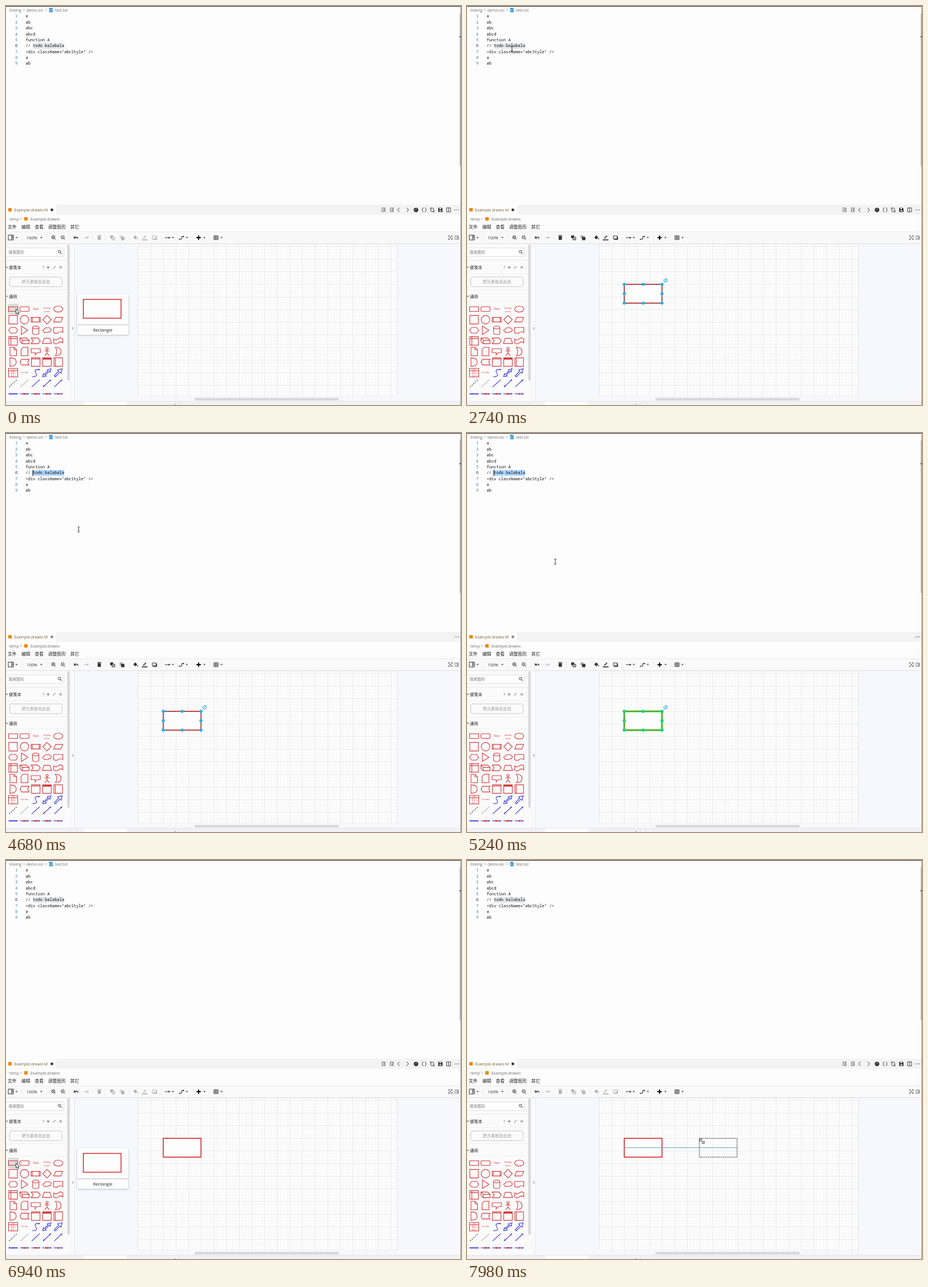
An HTML page for the animation above (8 s loop, 799 px wide and 701 px high).

```html
<!DOCTYPE html>
<html lang="zh">
<head>
<meta charset="utf-8">
<title>Diagram editor</title>
<style>
html, body { margin: 0; width: 100%; height: 100%; overflow: hidden; background: #fdfdfd; }
svg { display: block; width: 799px; height: 701px; }
text { white-space: pre; }
.ui { font: 6.9px "Open Sans", sans-serif; fill: #6b6b6b; }
.cjk { font: 7.8px "Noto Sans CJK SC", "Noto Sans CJK", sans-serif; fill: #222; }
.code { font: 7.05px "Noto Sans Mono", monospace; fill: #111; }
.serif { font-family: "Liberation Serif", serif; fill: #d33; }
.line { fill: none; stroke: #333; stroke-width: 1; }
.red { fill: none; stroke: #d33a3a; stroke-width: 1.1; }
.blue { fill: none; stroke: #3434cf; stroke-width: 1.1; }
</style>
</head>
<body>
<svg id="stage" viewBox="0 0 799 701"></svg>
<script>
const LOOP = 8000;
const BOX = { x: 276.2, y: 489, w: 66.2, h: 33 };
const INK = '#333';

const rect = (x, y, w, h, fill, more = '') =>
  `<rect x="${x}" y="${y}" width="${w}" height="${h}" fill="${fill}" ${more}/>`;
const text = (cls, x, y, s, more = '') => `<text class="${cls}" x="${x}" y="${y}" ${more}>${s}</text>`;
const path = (d, cls = 'line', more = '') => `<path class="${cls}" d="${d}" ${more}/>`;
const solid = (d, fill = INK) => `<path d="${d}" fill="${fill}"/>`;
const dot = (x, y, r, fill, more = '') => `<circle cx="${x}" cy="${y}" r="${r}" fill="${fill}" ${more}/>`;
const group = (id, body, more = '') => `<g id="${id}" ${more}>${body}</g>`;
const at = (x, y, body) => `<g transform="translate(${x} ${y})">${body}</g>`;
const chevron = (x, y) => path(`M${x - 1} ${y - 2}l2 2l-2 2`, 'line', 'stroke="#777" style="stroke:#777;stroke-width:.7"');
const caretDown = x => solid(`M${x - 2.2} 405.8h4.4l-2.2 2.6z`, '#666');

function codePane() {
  const lines = ['a', 'ab', 'abc', 'abcd', 'function A', '// todo balabala',
    '&lt;div className="abcStyle" /&gt;', 'a', 'ab'];
  const rows = lines.map((s, i) => {
    const y = 20.4 + i * 10.38;
    return text('code', 20.2, y, i + 1, `text-anchor="end" style="fill:${i === 5 ? '#0b216f' : '#35809a'}"`) +
      text('code', 34.5, y, s);
  }).join('');
  return rect(0, 0, 799, 349, '#fdfdfd') +
    text('ui', 6, 9.5, 'linking') + chevron(31.5, 7) + text('ui', 36, 9.5, 'demo-src') + chevron(70.5, 7) +
    solid('M76 3h4l2 2v6h-6z', '#3b9bd6') + path('M77.3 6.5h3.2M77.3 8.5h3.2', 'line', 'style="stroke:#fff;stroke-width:.6"') +
    text('ui', 86, 9.5, 'test.txt') +
    rect(47, 65, 55.2, 10.3, '#e3e8ec', 'id="picked"') + rows +
    dot(66.2, 70, .5, '#888') +
    group('caret', rect(46.6, 64.8, 1.1, 10.6, '#000')) +
    rect(796.5, 13, 2, 268, '#c6c6c6') + rect(796.5, 53, 2.5, 2, '#444');
}

function tabIcons() {
  const indent = x => path(`M${x - 3.5} 355h7M${x} 357h3.5M${x} 359h3.5M${x - 3.5} 361h7M${x - 3.5} 357l2 1.1l-2 1`, 'line', 'style="stroke-width:.8"');
  return indent(663) + indent(677.5) +
    path('M691 354.5l-3.5 3.7l3.5 3.7M703.5 354.5l3.5 3.7l-3.5 3.7') +
    solid('M720 354.5q4 0 4 3.5t-4 4.5q-4-1-4-4.5t4-3.5z') + path('M718.5 359l3-3', 'line', 'style="stroke:#fff;stroke-width:.7"') +
    path('M733 354.5q-1.5 0-1.5 1.7t-1.2 2q1.2.2 1.2 2t1.5 1.6M735.5 354.5q1.5 0 1.5 1.7t1.2 2q-1.2.2-1.2 2t-1.5 1.6', 'line', 'style="stroke-width:.9"') +
    path('M746 356.5v3.5q0 1.5 2 1.5h1.5M751 360v-3.5q0-1.500-2-1.500h-1.500', 'line', 'style="stroke-width:.9"') +
    dot(746, 355.5, 1.2, 'none', 'stroke="#333" stroke-width=".8"') + dot(751, 361, 1.2, 'none', 'stroke="#333" stroke-width=".8"') +
    solid('M759 354.500h6l1.500 1.500v6h-7.500z') + rect(761, 355, 3, 2, '#eee') + rect(761, 359, 3.5, 2, '#eee') +
    path('M773.700 354.700h7v7h-7zM777.200 354.700v7', 'line', 'style="stroke-width:.9"');
}

function tabBar() {
  return rect(0, 349, 799, 17.5, '#f3f3f3') + rect(0, 349, 88, 17.5, '#fdfdfd') +
    rect(4, 355, 6, 6, '#f08705') +
    text('ui', 14.3, 361, 'Example.drawio', 'style="fill:#7d6035"') + text('ui', 67, 361, 'M', 'style="fill:#7d6035"') +
    dot(80.5, 358.2, 2.4, INK, 'id="dirty"') + group('tools', tabIcons()) +
    [788.5, 791.5, 794.5].map(x => dot(x, 358.3, .7, INK)).join('') +
    text('ui', 6, 376.5, 'temp') + chevron(26.5, 374) + rect(32, 371, 6, 6, '#f08705') +
    text('ui', 43, 376.5, 'Example.drawio');
}

function toolbar() {
  const menu = [[3, '文件'], [27, '编辑'], [50.5, '查看'], [74, '调整图形'], [112.8, '其它']];
  const lens = (x, sign) => dot(x, 406.3, 2.8, 'none', 'stroke="#333" stroke-width="1"') +
    path(`M${x + 2} 408.3l2.3 2.4M${x - 1.4} 406.3h2.800${sign}`, 'line', 'style="stroke-width:.9"');
  const seps = [28, 71, 111, 152, 174, 216, 272, 327, 357];
  const layers = (x, a, b) => rect(x - 4, 403, 5, 5, a) + rect(x - 1, 406, 5, 5, b, 'stroke="#333" stroke-width=".8"');
  const edit = rect(161, 404.3, 5.6, 6.5, INK) + rect(160.3, 402.6, 7, 1.1, INK) +
    layers(187, INK, '#aaa') + layers(203.5, '#aaa', INK) +
    solid('M223.500 406.500l3.500-3.500l3.500 3.500l-3.500 3.500z') + dot(231, 409, 1, INK) +
    path('M241 408.500l5-5', 'line', 'style="stroke-width:1.7"') + rect(238.500, 410, 10, 1.700, INK) +
    path('M257 404h6.500v5h-6.500z') + path('M258 410h6.500v-5', 'line', 'style="stroke-width:1.3"');
  return rect(0, 380, 799, 17, '#fcfcfd') +
    menu.map(([x, s]) => text('cjk', x, 391, s)).join('') +
    rect(0, 397, 799, 20.500, '#f9f9fa') + rect(0, 396.500, 799, .7, '#e3e3e3') + rect(0, 417, 799, .9, '#dedede') +
    seps.map(x => rect(x, 401, .6, 12, '#e6e6e6')).join('') +
    path('M4 402.500h9v8.500h-9zM10 402.500v8.500M10 405h3M10 407.500h3') + caretDown(18.500) +
    text('ui', 36.3, 410, '100%', 'style="font-size:7.300px;fill:#333"') + caretDown(62) +
    lens(83, 'm-1.400-1.400v2.800') + lens(99.500, '') +
    path('M120.500 407.500q3.500-3.500 6.500 1M119.800 404.500v3.300h3.300', 'line', 'style="stroke-width:1.3"') +
    path('M143.500 407.500q-3.500-3.500-6.500 1M144.200 404.500v3.300h-3.300', 'line', 'opacity=".35"') +
    group('edit', edit) +
    path('M279 407h8') + solid('M285.500 405.200l3.500 1.800l-3.500 1.800z') + caretDown(293) +
    path('M304.500 410.500v-1h4v-4.500h3') + solid('M310.500 403.200l2.800 1.800l-2.800 1.800z') + dot(304.500, 410, 1, INK) + caretDown(317.500) +
    path('M338.200 403.200v7.500M334.500 407h7.500', 'line', 'style="stroke:#000;stroke-width:2"') + caretDown(348.500) +
    path('M365 403.500h7.500v7h-7.500zM365 405.800h7.500M365 408.200h7.500M367.500 403.500v7M370 403.500v7', 'line', 'style="stroke-width:.8"') + caretDown(378.500) +
    path('M777.500 405.500v-2h2M781.500 403.500h2v2M783.500 408v2.300h-2M779.500 410.300h-2v-2.300M779 405.500l3 3M782 405.500l-3 3', 'line', 'style="stroke-width:.9"') +
    path('M788.500 404h6v6h-6zM792 404v6M792.500 406h2M792.500 408h2', 'line', 'style="stroke:#777;stroke-width:.9"');
}

function palette() {
  const word = (s, size, y = 1) => text('serif', 0, y, s, `text-anchor="middle" style="font-size:${size}px"`);
  const head = (x, y, turn, fill = '#3434cf') => `<path d="M0 0l-3.200-1.500v3z" fill="${fill}" transform="translate(${x} ${y}) rotate(${turn})"/>`;
  const shapes = [
    ['M-8-4h16v8h-16z', 'M-6.500-4h13q1.500 0 1.500 1.500v5q0 1.500-1.500 1.500h-13q-1.500 0-1.500-1.500v-5q0-1.500 1.500-1.500z', 'TEXT', 'HEAD', 'M-8 0a8 5.300 0 0 1 16 0a8 5.300 0 0 1-16 0'],
    ['M-7.500-7.500h15v15h-15z', 'M-7.500 0a7.500 7.500 0 0 1 15 0a7.500 7.500 0 0 1-15 0', 'M-8-4h16v8h-16zM-6-4v8M6-4v8', 'M0-7.500l7.500 7.500l-7.500 7.500l-7.500-7.500z', 'M-4.500-4h12.500l-3.500 8h-12.500z'],
    ['M-4.500-5h9l3.500 5l-3.500 5h-9l-3.500-5z', 'M-5.500-7.500l11.500 7.500l-11.500 7.500z', 'M-5.500-5q0-2.500 5.500-2.500t5.500 2.500v10q0 2.500-5.500 2.500t-5.500-2.500zM-5.500-5q0 2.500 5.500 2.500t5.500-2.500', 'M-4.500-2q1-3.500 5-2.200q4-1.500 4.700 1.200q3.500 1 1.800 3.500q0 2.500-3.500 2.200q-3 2.800-5.500.5q-4 1.500-4.200-1.500q-3.500-1.700 1.700-3.700z', 'M-8-5h16v9q-4-3-8 0t-8 0z'],
    ['M-7.500-7.500h15v15h-15zM-7.500-4h15M-4-7.500v15', 'M-8-5h12l4 4v6h-12l-4-4zM-8-5l4 4h12M-4-1v6', 'M-8-5h12l4 5l-4 5h-12l3.500-5z', 'M-5-4.500h10l3 9h-16z', 'M-8-3.500q4 3.500 8 0t8 0v7q-4-3.500-8 0t-8 0z'],
    ['M-5.500-7.500h7l4.500 4.500v10.500h-11.500zM1.500-7.500v4.500h4.500', 'M-2-7.500h8v15h-12v-11z', 'M-8-5h16v7h-6l-3 4v-4h-7z', 'M-2-5.300a2 2 0 0 1 4 0a2 2 0 0 1-4 0M0-3.300v6.300M-4.500-1h9M0 3l-4 4.500M0 3l4 4.500', 'M-5-7.500q10 0 10 7.500t-10 7.500q5-7.500 0-15z'],
    ['M-5.500-7.500q11 0 11 7.500t-11 7.500z', 'M-5-5h13q-4 5 0 10h-13q-5-5 0-10z', 'M-7.500-7.500h15v15h-15zM-7.500-5.500h15', 'M-7.500-7.500h15v15h-15zM-7.500-5h15M-7.500-6.200h15', 'M-7.500-7.500h15v15h-15zM-5-7.500v15'],
    ['LIST', 'ITEM']
  ];
  const special = {
    TEXT: word('Text', 6, 1.500), HEAD: word('Heading', 3.600, -1) + word('lorem', 4, 5),
    LIST: path('M-8-7.500h16v15h-16zM-8-3.500h16', 'red') + word('List', 3.600, -4.400) + word('Item 1', 3.200, 0) + word('Item 2', 3.200, 3.200) + word('Item 3', 3.200, 6.300),
    ITEM: word('List Item', 3.600, 1)
  };
  const xs = [12.5, 32.5, 52.2, 72, 91.7], rowY = r => 532.500 + r * 18.620;
  let out = shapes.map((row, r) => row.map((d, c) =>
    at(xs[c], rowY(r), special[d] || path(d, 'red'))).join('')).join('');
  const slope = 'M-7 6.500L7-6.500';
  out += at(xs[2], rowY(6), path('M-6 7q11 0 6-6.500q-4-7 6-6', 'blue') + head(8, -5.500, 0)) +
    at(xs[3], rowY(6), path('M-7.500 7l1-5l1.500 1.500l7-7l-1.500-1.500l6.500-2l-1.500 6l-1.500-1.500l-7 7l1.500 1.500z', 'blue')) +
    at(xs[4], rowY(6), path('M-7 5.500l8-8.500l-2-2l8-2l-2 8l-2-2l-8 8.500z', 'blue'));
  ['stroke-dasharray="2 2" style="stroke:#222"', 'stroke-dasharray="1 1.500" style="stroke:#555"', '', '', ''].forEach((more, i) => {
    out += at(xs[i], rowY(7), path(slope, 'blue', more) + (i > 2 ? head(7, -6.500, -43) : '') + (i === 3 ? head(-7, 6.500, 137) : ''));
  });
  xs.forEach((x, i) => {
    out += at(x, rowY(8), path('M-8 0H8', 'blue', i ? '' : 'style="stroke-width:1.800"') +
      (i ? head(8, 0, 0) + rect(i === 4 ? -1.500 : -3, -1.2, i === 4 ? 3.500 : 6, 2.400, '#d33') : ''));
  });
  return out;
}

function sidebar() {
  const fold = y => solid(`M0 ${y}h3l-1.500 2.500z`, '#555');
  return rect(0, 418, 112, 276, '#fbfbfc') +
    rect(-2, 425, 103.500, 15, '#fff', 'rx="2" stroke="#d5d5d5" stroke-width=".8"') +
    text('cjk', 4.500, 434.800, '搜索图形', 'style="font-size:6.900px;fill:#777"') +
    dot(94, 431.500, 2.300, 'none', 'stroke="#444" stroke-width="1"') + path('M95.700 433.200l2.500 2.600') +
    rect(0, 446, 108, .7, '#e4e4e4') + fold(458) + text('cjk', 5, 462, '便笺本', 'style="font-size:7.300px"') +
    text('ui', 64, 461.500, '?', 'style="fill:#666"') + path('M74 456.700v5M71.500 459.200h5M82.500 461.500l4.500-4.500M94 457.200l4 4M98 457.200l-4 4', 'line', 'style="stroke:#666;stroke-width:1"') +
    rect(0, 470, 108, .7, '#eee') +
    rect(6.500, 476, 92, 17, 'none', 'rx="3" stroke="#999" stroke-dasharray="2 1.300" stroke-width=".9"') +
    text('cjk', 27.500, 487.300, '把元素拖至此处', 'style="font-size:7.200px;fill:#999"') +
    rect(0, 498, 108, .7, '#e8e8e8') + fold(509) + text('cjk', 5, 513, '通用', 'style="font-size:7.300px"') +
    rect(0, 519, 108, .7, '#eee') +
    rect(3, 523, 19.500, 19, '#dcdcdc', 'rx="3" id="hover"') + palette() +
    rect(107.500, 419, 4.500, 239, '#d9d9dc', 'rx="1"') + rect(112, 418, 8, 276, '#f9f9fb') + rect(120, 418, .8, 276, '#e6e6ea') +
    [564.800, 567].map(y => rect(116, y, 2.500, 1, '#888')).join('');
}

function canvasArea() {
  const step = 22.2, minor = step / 4;
  let fine = '', bold = '';
  for (let i = 1; i < 82; i++) {
    const x = (232 + i * minor).toFixed(2);
    if (i % 4) fine += `M${x} 418V686`; else bold += `M${x} 418V686`;
  }
  for (let i = -12; i < 36; i++) {
    const y = (BOX.y + i * minor).toFixed(2);
    if (i % 4) fine += `M232 ${y}H687`; else bold += `M232 ${y}H687`;
  }
  return rect(120, 418, 679, 276, '#f7f8fd') + rect(232, 418, 455, 268, '#fdfdfd', 'stroke="#dcdce0" stroke-width=".8"') +
    path(fine, 'line', 'style="stroke:#f3f3f3;stroke-width:.6"') + path(bold, 'line', 'style="stroke:#e5e5e6;stroke-width:.8"') +
    rect(120, 686, 679, 8, '#f8f8fa') + rect(331, 688.500, 253, 4.500, '#d9d9db', 'rx="1"') +
    rect(0, 694, 799, 7, '#f2f2f4') + rect(0, 694, 799, .7, '#e0e0e0') + rect(137, 695, 75, 6, '#fff') + rect(304, 695, .7, 6, '#ddd') +
    rect(296, 700, 2, 1, '#777');
}

function scene() {
  const { x, y, w, h } = BOX;
  let grips = rect(x, y, w, h, 'none', 'stroke="#333" stroke-width=".9" stroke-dasharray="2 2"');
  for (const i of [0, 1, 2]) for (const j of [0, 1, 2])
    if (i !== 1 || j !== 1) grips += dot(x + w * i / 2, y + h * j / 2, 2.8, '#29b0e8');
  grips += path('M347 479.800a2.800 2.800 0 1 0 3.200 0', 'line', 'style="stroke:#29a8e0;stroke-width:1.200"') + solid('M348 478l3 1l-2.500 2.500z', '#29a8e0');
  const tip = rect(125, 506, 90, 71.500, '#fdfdfd', 'rx="3" filter="url(#shade)"') +
    rect(135.800, 515.500, 66.200, 33, '#fdfdfd', 'stroke="#d32a2a" stroke-width="1.500"') + rect(125, 559.500, 90, 1, '#bbb') +
    text('ui', 170, 572, 'Rectangle', 'text-anchor="middle" style="font-size:7.500px;fill:#222"');
  const arrow = '<path d="M0 0v8.500l2-1.800l1.400 3.200l1.500-.7l-1.400-3h2.800z" fill="#fff" stroke="#111" stroke-width=".8"/>';
  const beam = path('M-2-4.500h1.500l.5.500l.5-.5h1.500M0-4v8M-2 4.500h1.500l.5-.5l.5.500h1.500', 'line', 'style="stroke:#222;stroke-width:.9"');
  const sizer = '<path d="M.5 1h4l-1.300 1.300l4 4l1.300-1.300v4h-4l1.300-1.300l-4-4l-1.300 1.300z" fill="#fff" stroke="#111" stroke-width=".8"/>';
  return '<defs><filter id="shade" x="-10%" y="-10%" width="120%" height="125%"><feDropShadow dx="0" dy="1" stdDeviation="1.500" flood-opacity=".3"/></filter></defs>' +
    codePane() + tabBar() + canvasArea() + sidebar() + toolbar() +
    group('box', rect(x, y, w, h, '#fdfdfd', 'stroke="#d02828" stroke-width="1.600"')) + group('grips', grips) +
    group('glow', rect(x, y, w, h, 'none', 'stroke="#0f0" stroke-opacity=".42" stroke-width="4.500"')) +
    group('tip', tip) +
    group('guide', path(`M${x} 505.500H474.400`, 'line', 'style="stroke:#6aa5c8;stroke-width:1"')) +
    group('ghost', rect(0, 0, w, h, 'none', 'stroke="#222" stroke-width="1" stroke-dasharray="2 1.300"')) +
    group('pointer', group('arrow', arrow) + group('beam', beam) + group('sizer', sizer)) +
    rect(0, 0, 799, 1, '#222') + rect(798.300, 0, .7, 701, '#777');
}

// time, x, y, pointer kind from that time on
const moves = [
  [0, 17.500, 532.500, 'arrow'], [470, 17.500, 532.500, 'sizer'], [1000, 336, 493, 'sizer'], [1230, 276, 489, 'sizer'],
  [1370, 272, 490, 'sizer'], [1470, 272, 490, 'arrow'], [2170, 205, 322, 'beam'], [2740, 79, 75, 'beam'],
  [2900, 82, 70, 'arrow'], [4020, 82, 70, 'arrow'], [4200, 80, 71, 'arrow'], [4350, 80, 71, 'beam'],
  [4910, 155, 226, 'beam'], [5480, 155, 226, 'beam'], [5800, 210, 390, 'arrow'], [6280, 260, 575, 'arrow'],
  [6330, 260, 575, 'arrow'], [6860, 17.500, 532.500, 'arrow'], [7180, 17.500, 532.500, 'sizer'],
  [7880, 408, 489, 'sizer'], [LOOP, 408, 489, 'sizer']
];
const shown = {
  tip: [[0, 470], [6900, 7200]], hover: [[0, 470], [6850, 7200]],
  ghost: [[500, 1370], [7230, LOOP]], guide: [[7840, LOOP]],
  box: [[1370, LOOP]], grips: [[1370, 6280]], glow: [[5240, 5580]],
  caret: [[4380, 4700], [5240, 5740]], tools: [[0, 4070], [6230, LOOP]]
};
const within = (t, spans) => spans.some(([a, b]) => t >= a && t < b);

const stage = document.getElementById('stage');
stage.innerHTML = scene();
const el = id => document.getElementById(id);
const place = (id, x, y) => el(id).setAttribute('transform', `translate(${x.toFixed(1)} ${y.toFixed(1)})`);

function render(t) {
  const i = moves.findIndex((m, k) => t >= m[0] && t < moves[k + 1][0]);
  const [t0, x0, y0, kind] = moves[i], [t1, x1, y1] = moves[i + 1];
  const p = (t - t0) / (t1 - t0), e = p * p * (3 - 2 * p);
  const x = x0 + (x1 - x0) * e, y = y0 + (y1 - y0) * e;
  place('pointer', x, y);
  place('ghost', t < 1370 && t >= 1230 ? BOX.x : x, t >= 1230 && t < 1370 ? BOX.y : y);
  for (const id of ['arrow', 'beam', 'sizer']) el(id).style.display = id === kind ? '' : 'none';
  for (const id in shown) el(id).style.display = within(t, shown[id]) ? '' : 'none';
  const coding = !within(t, shown.tools);
  el('picked').setAttribute('fill', coding ? '#add6ff' : '#e3e8ec');
  el('dirty').setAttribute('fill', coding ? '#888' : INK);
  el('edit').style.opacity = t >= 1420 && t < 6280 ? 1 : .35;
}

const start = performance.now();
function tick() {
  render((performance.now() - start) % LOOP);
  requestAnimationFrame(tick);
}
tick();
</script>
</body>
</html>
```
